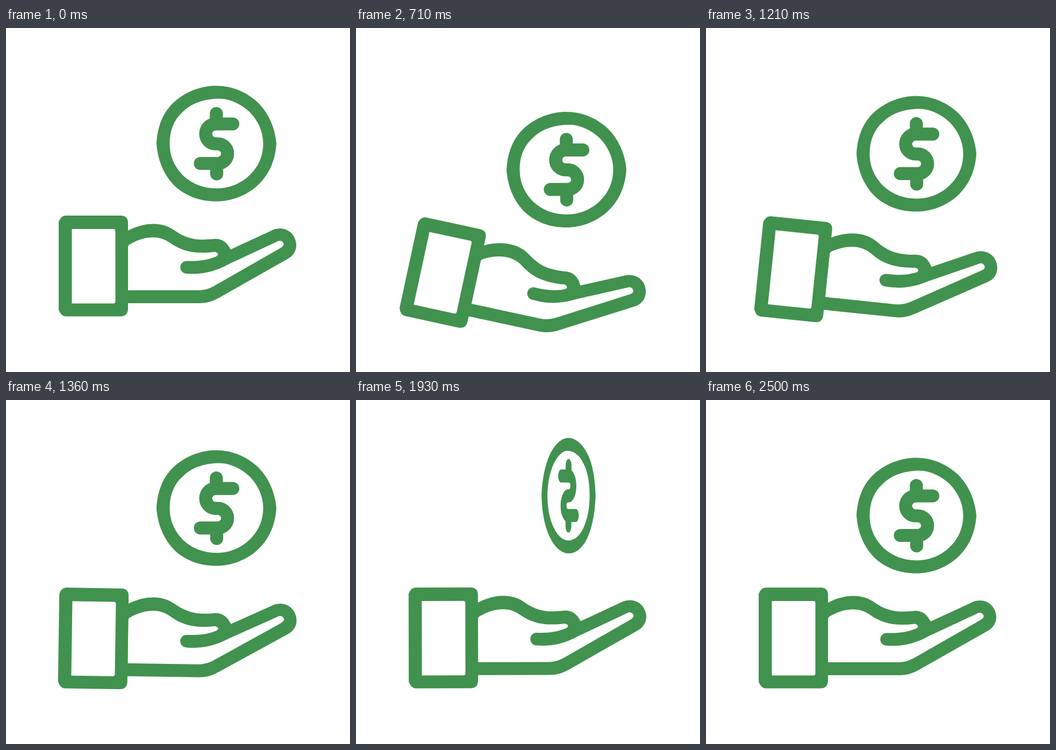
Recreate the animation shown at these times as an HTML page. Size 640 by 640 pixels, loop 3 s.

```html
<!DOCTYPE html>
<html lang="en">
<head>
<meta charset="utf-8">
<title>Hand and coin</title>
<style>
  html, body { margin: 0; height: 100%; overflow: hidden; background: #fff; }
  svg { display: block; width: 100%; height: 100%; }
</style>
</head>
<body>
<svg viewBox="0 0 640 640" fill="#41924e" fill-rule="evenodd">
  <g id="coin">
    <path d="M280 215C282 181 293 156 312.5 138C335 118 363 107.5 391 107.5C420 107.5 448 119 469 139C490 160 501 188 503 215C501 245 491 270 471 290C449 312 419 322.5 391 322.5C361 322.5 335 313 314 294C293 273 282 245 280 215Z
      M304.5 215C304.5 190 313 170 329 156C346 139 370 131.5 398 131.5C418 132 438 142 453 156C469 172 478.5 193 478.5 215C478.5 238 470 258 453 274C437 290 414 298.5 392 298.5C368 298.5 346 290 330 275C313 258 304.5 238 304.5 215Z"/>
    <path fill="none" stroke="#41924e" stroke-width="24.2" stroke-linecap="round"
      d="M391.3 159V178M422 178.5H390A18.5 18.5 0 0 0 390 215.5H394A18.25 18.25 0 0 1 394 252H361.5M392 252V271.5"/>
  </g>
  <g id="hand">
    <path d="M98 361Q102 349 111 349H214Q227 349.5 227 363V523Q226 536.5 213 536.5H111Q102 536 98 524Z
      M122.5 374H200Q203.5 374 203.5 378V509Q203 512.5 200 512.5H122.5Z"/>
    <path d="M220 380L227 377C258 361 291 360 314 377C340 395 360 395 386 392.5C402 391 411 399 418 412L497 375.5C514 369 532 376 538 393C544 410 536 423 525 429L398 501C384 509 374 512 358 512H220Z
      M227 488H355C368 488 376 486 387 480L512 408.5C517 405 518 402 515 398.5C512 395 508 395 503 398L415 439C384 456 360 458.5 336 457A11.75 11.75 0 0 1 336 433.5C358 434 374 432 390 425.5C397 422.5 395 417.5 388 416.5C352 421 328 416 304 399C284 385 258 387 231 402Q227 404 227 408Z"/>
  </g>
</svg>
<script>
  const LOOP = 3000, FPS = 14, LAST_STEP = 35;
  const coin = document.getElementById('coin');
  const hand = document.getElementById('hand');

  // Keys are [step, value] pairs, eased in and out between neighbours.
  const coinY = [[0, 0], [11.4, 50.5], [13.6, 50.5], [22.85, -52.6], [34.4, 0]];
  const coinTurn = [[22.45, 0], [34.4, 2 * Math.PI]];
  const handAngle = [[0, 0], [11.4, 12.7], [12.8, 12.7], [22.35, -3.83], [27.5, 0]];

  function track(keys, step) {
    let [from, value] = keys[0];
    for (const [to, next] of keys) {
      if (step < to) {
        const x = Math.max(0, (step - from) / (to - from || 1));
        return value + (next - value) * x * x * (3 - 2 * x);
      }
      [from, value] = [to, next];
    }
    return value;
  }

  function draw(now) {
    const step = Math.min(LAST_STEP, Math.floor((now % LOOP + 5) * FPS / 1000));
    const turn = Math.cos(track(coinTurn, step));
    coin.setAttribute('transform',
      `translate(394.2 ${track(coinY, step)}) scale(${turn} 1) translate(-394.2 0)`);
    hand.setAttribute('transform', `rotate(${track(handAngle, step)} 104 443)`);
  }

  const start = performance.now();
  function tick() {
    draw(performance.now() - start);
    requestAnimationFrame(tick);
  }
  tick();
</script>
</body>
</html>
```
